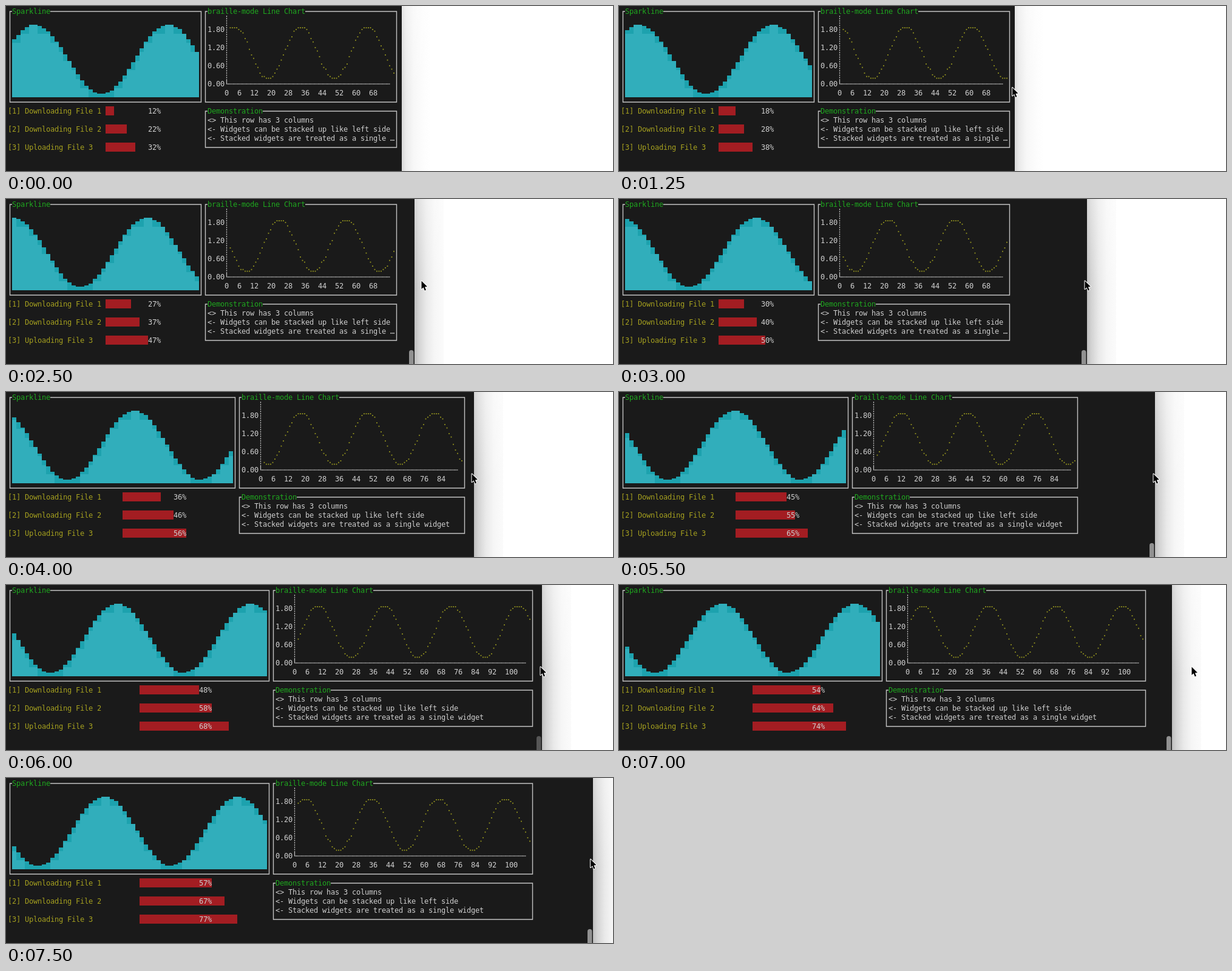
These frames come from a looping animation (1000x273 px, 8000 ms). An HTML page with a canvas:

```html
<!DOCTYPE html>
<html lang="en">
<head>
<meta charset="utf-8">
<title>Terminal dashboard</title>
<style>
  html, body { margin: 0; width: 100%; height: 100%; overflow: hidden; background: #fff; }
  canvas { display: block; }
</style>
</head>
<body>
<canvas id="stage" width="1000" height="273"></canvas>
<script>
const ctx = document.getElementById('stage').getContext('2d');
const STAGE_W = 1000, STAGE_H = 273, LOOP = 8000, TICK = 500;
const CELL_W = 7, CELL_H = 15;
const COLOR = {
  back: '#1a1a1a', line: '#c2c2c2', text: '#cfcfcf', title: '#1fa81f',
  label: '#a5a01f', dot: '#98981f', full: '#31aebb', partial: '#1da2ae', gauge: '#a31d22'
};

const colX = c => 3 + c * CELL_W;
const rowY = r => 1 + r * CELL_H;
const midX = c => colX(c) + 3.5;
const midY = r => rowY(r) + 8;
const wave = i => 1 + Math.sin(i / 5);

// Each entry changes some of the window state from its time on.
const EVENTS = [
  [0, { edge: 652, scroll: 0, active: false, cursor: null }],
  [250, { cursor: [746, 58] }],
  [500, { cursor: [735, 87] }],
  [750, { cursor: [664, 131] }],
  [1000, { cursor: [649, 133] }],
  [1250, { cursor: [647.5, 134.5] }],
  [1500, { cursor: [649, 134.5] }],
  [1750, { cursor: [647, 134.5], active: true, scroll: 1 }],
  [2500, { edge: 673, cursor: [684, 135] }],
  [2750, { edge: 715, cursor: [741, 135] }],
  [3000, { edge: 771, cursor: [767, 135] }],
  [3500, { scroll: 0.5 }],
  [3750, { scroll: 0 }],
  [5000, { edge: 799, cursor: [824, 136], scroll: 1 }],
  [5250, { edge: 855, cursor: [881, 135] }],
  [5500, { edge: 883, cursor: [880, 135] }],
  [6000, { scroll: 0.5 }],
  [6250, { scroll: 0 }],
  [7000, { edge: 911, cursor: [943, 135], scroll: 1 }],
  [7250, { edge: 967, cursor: [964, 135] }],
  [7500, { cursor: [962.5, 134] }]
];

const stateAt = t => Object.assign({}, ...EVENTS.filter(e => e[0] <= t).map(e => e[1]));
const columnsAt = t => t < 4000 ? 92 : t < 6000 ? 108 : 124;

function rect(x, y, w, h, color) {
  ctx.fillStyle = color;
  ctx.fillRect(x, y, w, h);
}

function print(str, col, row, color = COLOR.text) {
  ctx.fillStyle = color;
  [...str].forEach((ch, i) => ctx.fillText(ch, colX(col + i), rowY(row) + 12));
}

function stroke(points, width = 1.4, dash = []) {
  ctx.strokeStyle = COLOR.line;
  ctx.lineWidth = width;
  ctx.setLineDash(dash);
  ctx.beginPath();
  points.forEach(([x, y]) => ctx.lineTo(x, y));
  ctx.stroke();
  ctx.setLineDash([]);
}

function box(title, left, top, right, bottom) {
  const x0 = midX(left), x1 = midX(right), y0 = midY(top), y1 = midY(bottom);
  stroke([[colX(left + 1), y0], [x0, y0], [x0, y1], [x1, y1], [x1, y0],
    [colX(left + 1 + title.length), y0]]);
  print(title, left + 1, top, COLOR.title);
}

function sparkline(step, half) {
  box('Sparkline', 0, 0, half - 1, 10);
  const base = rowY(10);
  for (let c = 0; c < half - 2; c++) {
    const value = Math.floor(100 * wave(step + c) + 10);
    const eighths = Math.floor(value * 64 / 209 + 0.5);
    const full = Math.floor(eighths / 8) * CELL_H;
    const rest = Math.round(eighths % 8 / 8 * CELL_H);
    rect(colX(c + 1), base - full, CELL_W, full, COLOR.full);
    rect(colX(c + 1), base - full - rest, CELL_W, rest, COLOR.partial);
  }
}

function lineChart(step, left, right) {
  box('braille-mode Line Chart', left, 0, right, 10);
  const axis = left + 5, width = right - axis - 1;
  ['0.00', '0.60', '1.20', '1.80'].forEach((s, i) => print(s, left + 1, 8 - 2 * i));

  const x = midX(axis), y = midY(8);
  stroke([[x, rowY(1)], [x, rowY(8)]], 1.2, [2.2, 1.55]);
  stroke([[x, rowY(8)], [x, y], [colX(axis + 1), y]], 1.2);
  stroke([[colX(axis + 1), y], [colX(right - 1), y]], 1.4, [1.15, 0.6]);

  for (let pos = 0; pos < width; pos += pos < 6 ? 3 : 4) {
    const label = String(2 * pos);
    if (pos + label.length <= width) print(label, axis + pos, 9);
  }

  for (let p = 0; p < 2 * width; p++) {
    const level = Math.floor(wave(2 * step + p) / (2.4 / 28) + 0.5);
    const dx = colX(axis + 1 + (p >> 1)) + (p % 2 ? 6 : 2.5);
    const dy = rowY(7 - (level >> 2)) + 13.5 - (level % 4) * 2.83;
    rect(dx - 0.9, dy - 0.9, 1.8, 1.8, COLOR.dot);
  }
}

function gauge(label, row, percent, half) {
  const width = half / 2;
  print(label, 0, row, COLOR.label);
  rect(colX(width), rowY(row), Math.floor(percent * width / 100) * CELL_W, CELL_H, COLOR.gauge);
  print(percent + '%', width + Math.floor((width - 3) / 2), row);
}

function notes(left, right) {
  box('Demonstration', left, 11, right, 15);
  const room = right - left - 1;
  ['<> This row has 3 columns',
   '<- Widgets can be stacked up like left side',
   '<- Stacked widgets are treated as a single widget'
  ].forEach((s, i) => {
    print(s.length > room ? s.slice(0, room - 1) + '…' : s, left + 1, 12 + i);
  });
}

function shadow(edge, active) {
  const stops = active
    ? [[0, 190], [0.15, 211], [0.4, 233], [0.68, 246], [1, 251]]
    : [[0, 216], [0.15, 234], [0.4, 247], [0.7, 252], [1, 255]];
  const across = ctx.createLinearGradient(edge, 0, edge + 48, 0);
  stops.forEach(([at, v]) => across.addColorStop(at, `rgb(${v},${v},${v})`));
  rect(edge, 0, 48, STAGE_H, across);
  const down = ctx.createLinearGradient(0, 0, 0, 150);
  down.addColorStop(0, 'rgba(255,255,255,0.35)');
  down.addColorStop(1, 'rgba(255,255,255,0)');
  rect(edge, 0, 48, 150, down);
}

function scrollbar(edge, alpha) {
  ctx.globalAlpha = alpha;
  ctx.fillStyle = '#919191';
  ctx.beginPath();
  ctx.roundRect(edge - 9, 250, 7.5, 30, 3.75);
  ctx.fill();
  ctx.globalAlpha = 1;
}

function pointer([x, y]) {
  ctx.save();
  ctx.translate(x, y);
  ctx.beginPath();
  [[0.5, 0.5], [0.5, 14], [3.6, 11.2], [5.8, 16.4], [8, 15.4], [5.9, 10.4], [10, 10]]
    .forEach(([px, py]) => ctx.lineTo(px, py));
  ctx.closePath();
  ctx.lineJoin = 'round';
  ctx.lineWidth = 2;
  ctx.strokeStyle = '#fff';
  ctx.stroke();
  ctx.fillStyle = '#000';
  ctx.fill();
  ctx.restore();
}

function draw(t) {
  const { edge, scroll, active, cursor } = stateAt(t);
  const columns = columnsAt(t), half = columns / 2;
  const step = 3 + Math.floor(t / TICK), percent = 3 * step + 3;

  rect(0, 0, STAGE_W, STAGE_H, '#fff');
  shadow(edge, active);
  rect(0, 0, edge, STAGE_H, COLOR.back);

  ctx.font = '12px "DejaVu Sans Mono", monospace';
  sparkline(step, half);
  lineChart(step, half, columns - 1);
  gauge('[1] Downloading File 1', 11, percent, half);
  gauge('[2] Downloading File 2', 13, percent + 10, half);
  gauge('[3] Uploading File 3', 15, percent + 20, half);
  notes(half, columns - 1);

  if (scroll) scrollbar(edge, scroll);
  if (cursor) pointer(cursor);
}

const start = performance.now();
function loop() {
  draw((performance.now() - start) % LOOP);
  requestAnimationFrame(loop);
}
loop();
</script>
</body>
</html>
```
